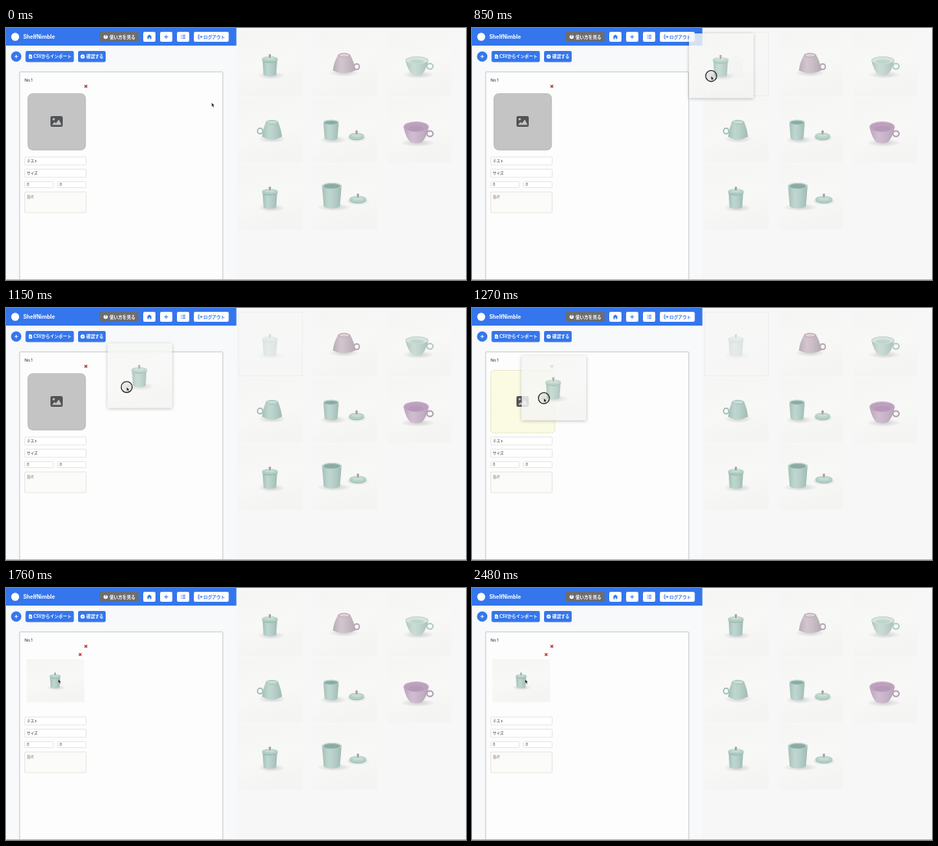
An HTML page for the animation above (2510 ms loop, 600 by 329 pixels).

```html
<!DOCTYPE html>
<html>
<head>
<meta charset="utf-8">
<title>Catalogue editor</title>
<style>
html, body { margin: 0; width: 100%; height: 100%; overflow: hidden; background: #f7f7f7; }
svg { display: block; width: 100%; height: 100%; }
text { font-family: Inter, "Noto Sans CJK JP", "Noto Sans CJK", sans-serif; fill: #222; }
.b { font-weight: 700; font-size: 5.6px; }
.jp { font-family: "Noto Sans CJK JP", "Noto Sans CJK", sans-serif; }
.s { font-size: 4.7px; }
.w { fill: #fff; }
.blue { fill: #3576ec; }
.field { fill: #fff; stroke: #dcdcdc; stroke-width: .7; }
.line { fill: none; stroke: #3576ec; stroke-width: 1; }
</style>
</head>
<body>
<svg id="stage" viewBox="0 0 600 329"></svg>
<script>
const LOOP = 2510, PRESS = 610, DRAG = 710, DROP = 1710;
const GRAB = { x: 32, y: 55 }, LAG = 12;
const mint = ['#b5d1c9', '#9fbfb6', '#c6dcd5'];
const pale = ['#c2d8d0', '#adc8be', '#d6e4de'];
const mauve = ['#cdbcc7', '#b5a1ae', '#ddd0d8'];
const plum = ['#cbb2ca', '#b193b2', '#bd9fbe'];

const rect = (x, y, w, h, r, more) =>
  `<rect x="${x}" y="${y}" width="${w}" height="${h}" rx="${r}" ${more}/>`;
const oval = (x, y, rx, ry, more) =>
  `<ellipse cx="${x}" cy="${y}" rx="${rx}" ry="${ry}" ${more}/>`;
const path = (d, more) => `<path d="${d}" ${more}/>`;
const text = (x, y, str, more) => `<text x="${x}" y="${y}" ${more}>${str}</text>`;
const group = (x, y, body, more = '') => `<g transform="translate(${x} ${y})" ${more}>${body}</g>`;
const fill = c => `fill="${c}"`;
const shadow = (x, y, rx, ry) => oval(x, y, rx, ry, 'fill="url(#shade)"');

// Tapered vessel between two ellipses, with side shading
function vessel(x, top, rTop, bottom, rBot, ry, [base, dark]) {
  const ryb = ry * rBot / rTop;
  const d = `M${x - rTop} ${top} L${x - rBot} ${bottom} A${rBot} ${ryb} 0 0 0 ${x + rBot} ${bottom} L${x + rTop} ${top}Z`;
  return path(d, fill(base)) + path(d, 'fill="url(#side)"') +
    oval(x, top, rTop, ry, fill(dark));
}

function lid(x, y, rx, ry, [base, dark, light]) {
  return oval(x, y + 1.2, rx, ry, fill(dark)) + oval(x, y, rx, ry, fill(base)) +
    oval(x, y - .9, rx * .62, ry * .55, fill(light)) +
    path(`M${x - .8} ${y - ry + 2}v-3h1.6v3z`, fill('#968c84')) +
    `<circle cx="${x}" cy="${y - ry - 1.6}" r="1.6" fill="#aaa098"/>`;
}

function jar() {
  return shadow(43, 56, 18, 5) +
    vessel(41.2, 37, 9.4, 54.5, 8.3, 2.8, mint) + lid(41.2, 34.4, 10.4, 3.3, mint);
}

function openJar(x, top, r, bottom, lx, ly, lr) {
  return shadow(x + 3, bottom + 2, r * 1.8, 5) + shadow(lx, ly + 3, lr * 1.4, 5) +
    vessel(x, top, r, bottom, r * .84, r * .32, mint) +
    oval(x, top, r, r * .32, fill(mint[2])) +
    oval(x, top + .5, r * .87, r * .25, fill('#8aaba3')) +
    lid(lx, ly, lr, 4.2, mint);
}

function handle(x, y, rx, ry, c) {
  return oval(x, y, rx, ry, `fill="none" stroke="${c}" stroke-width="1.7"`);
}

function bowl(x, top, r, ry, bottom, hx, hy, tone) {
  const d = `M${x - r} ${top} Q${x - r * .8} ${bottom - 5} ${x - r * .45} ${bottom} Q${x} ${bottom + 2.5} ${x + r * .45} ${bottom} Q${x + r * .8} ${bottom - 5} ${x + r} ${top}Z`;
  return shadow(x + 2, bottom + 1, r * 1.4, 5) + handle(hx, hy, 4, 3.6, tone[1]) +
    path(d, fill(tone[0])) + path(d, 'fill="url(#side)"') +
    oval(x, top, r, ry, fill(tone[0])) +
    oval(x, top + .4, r - 1, ry - .8, fill(tone[2])) +
    oval(x, top + ry * .35, r * .62, ry * .5, `fill="${tone[1]}" opacity=".55"`);
}

function upturned(x, top, rTop, bottom, rBot, hx, hy, tone) {
  const d = `M${x - rTop} ${top} Q${x - rBot + 1} ${top + 9} ${x - rBot} ${bottom} Q${x} ${bottom + 7} ${x + rBot} ${bottom} Q${x + rBot - 1} ${top + 9} ${x + rTop} ${top}Z`;
  return shadow(x, bottom + 3, rBot * 1.4, 5) + handle(hx, hy, 3.4, 3.6, tone[1]) +
    path(d, fill(tone[0])) + path(d, 'fill="url(#side)"') +
    oval(x, top, rTop, 2.9, fill(tone[1])) +
    oval(x, top, rTop - 1.2, 2, fill(tone[2]));
}

const photo = (w, h) => rect(0, 0, w, h, 0, 'fill="url(#paper)"');
const tile = (x, y, body, more) => group(x, y, photo(84, 84) + body, more);

function blueButton(x, w, label, lx) {
  return rect(x, 30, w, 14.5, 2, 'class="blue"') + text(lx, 39.2, label, 'class="b jp w"');
}

function cross(x, y, more = '') {
  return path(`M${x - 1.7} ${y - 1.7}l3.4 3.4m0 -3.4l-3.4 3.4`,
    `stroke="#bd2c20" stroke-width="1.25" fill="none" ${more}`);
}

const defs = `<defs>
  <linearGradient id="side"><stop offset="0" stop-color="#4f625e" stop-opacity=".2"/>
    <stop offset=".35" stop-color="#fff" stop-opacity=".12"/>
    <stop offset="1" stop-color="#4f625e" stop-opacity=".22"/></linearGradient>
  <radialGradient id="shade"><stop offset="0" stop-color="#8c938e" stop-opacity=".4"/>
    <stop offset="1" stop-color="#8c938e" stop-opacity="0"/></radialGradient>
  <linearGradient id="paper" x2=".3" y2="1"><stop offset="0" stop-color="#f5f6f4"/>
    <stop offset=".6" stop-color="#f8f8f7"/><stop offset="1" stop-color="#f4f4f3"/></linearGradient>
  <filter id="lift" x="-20%" y="-20%" width="140%" height="140%">
    <feDropShadow dx="0" dy="1" stdDeviation="2.2" flood-color="#000" flood-opacity=".33"/></filter>
</defs>`;

const header = rect(0, 0, 300.5, 23, 0, 'class="blue"') +
  '<circle cx="12" cy="11.5" r="5.2" fill="#fff"/>' +
  text(22.5, 14.1, 'ShelfNimble', 'class="w" font-weight="700" font-size="6.9"') +
  rect(122, 5, 51, 13, 2.5, 'fill="#6b6d71"') +
  '<circle cx="130" cy="11.6" r="2.7" fill="#fff"/>' +
  text(130, 13.2, '?', 'text-anchor="middle" font-size="4.4" font-weight="800" style="fill:#6b6d71"') +
  text(135, 13.7, '使い方を見る', 'class="b jp w"') +
  [[179, 16], [201, 16], [223, 16], [245, 45.5]].map(([x, w]) => rect(x, 5, w, 13, 2, 'class="w"')).join('') +
  path('M183.6 11.6L187 8.6l3.4 3h-.9v2.9h-1.7v-2h-1.6v2h-1.7v-2.9z', 'class="blue"') +
  path('M206.3 11.6h5.2m-2.6 -2.6v5.2', 'class="line"') +
  path('M228.3 9.5h1m1 0h3.6m-5.6 2.1h1m1 0h3.6m-5.6 2.1h1m1 0h3.6', 'class="line"') +
  path('M252.6 9.2h-1.6v4.8h1.6m0 -2.4h3m-1.5 -1.7l1.7 1.7l-1.7 1.7', 'class="line"') +
  text(257.6, 13.7, 'ログアウト', 'class="b jp blue" style="fill:#3576ec"');

const tools = '<circle cx="13.3" cy="37.2" r="6.7" class="blue"/>' +
  path('M11 37.2h4.6m-2.3 -2.3v4.6', 'stroke="#fff" stroke-width=".9"') +
  blueButton(25.5, 63, 'CSVからインポート', 35.8) +
  path('M29.8 34.4h2.8l1.5 1.5v4.1h-4.3z', 'class="w"') +
  path('M30.8 37.2h2.3m-2.3 1.3h2.3', 'stroke="#3576ec" stroke-width=".6"') +
  blueButton(94, 36, '確認する', 104.8) +
  '<circle cx="100" cy="37.2" r="2.7" class="w"/>' +
  path('M98.7 37.2l1 1l1.7 -1.9', 'class="line" style="stroke-width:.8"');

const form = rect(17.8, 57.2, 265, 280, 1, 'fill="#fdfdfd" stroke="#bcbcbc" stroke-width=".8"') +
  text(24.2, 69.7, 'No.1', 'font-size="5.3"') + cross(104.2, 76.2) +
  rect(24.5, 168.3, 80, 10.6, 1, 'class="field"') + text(27.2, 175.4, 'テスト', 'class="s jp"') +
  rect(24.5, 184.3, 80, 10.6, 1, 'class="field"') + text(27.2, 191.4, 'サイズ', 'class="s jp"') +
  rect(24.5, 200.6, 37.2, 7.8, 1, 'class="field"') + text(27.2, 206.2, '0', 'class="s"') +
  rect(67.5, 200.6, 37, 7.8, 1, 'class="field"') + text(70, 206.2, '0', 'class="s"') +
  rect(24.5, 214, 80, 27, 1, 'fill="#fbfbf9" stroke="#dedad2" stroke-width=".7"') +
  text(27.2, 221.6, '備考', 'class="s jp" style="fill:#8b8b8b"');

const picture = rect(58, 115, 16, 14, 2, 'fill="#515355"') +
  '<circle cx="62.2" cy="119" r="1.5" fill="#c4c4c4"/>' +
  path('M60 126.5l3.2 -3.7l1.8 1.8l4 -5l3.4 6.9z', fill('#c4c4c4'));

const slot = `<g id="empty">${rect(28.7, 85.7, 75, 73.5, 6, 'fill="#c4c4c4" stroke="#a9a9a9" stroke-width=".7"')}</g>
  <g id="hot">${rect(24.5, 81.5, 83.5, 81.5, 4, 'fill="#fbfae2" stroke="#d5d4a6" stroke-width=".7" stroke-dasharray="2 1"')}</g>
  <g id="icon">${picture}</g>
  <g id="placed">${group(27, 93, photo(75, 56))}
    ${group(35.2, 90.8, jar(), '').replace('(35.2 90.8)', '(35.2 90.8) scale(.7)')}
    ${cross(96.7, 86.8)}</g>`;

const shelf = `<g id="taken">${rect(303.3, 5.3, 83.4, 83.4, 0, 'fill="none" stroke="#e6e6e6" stroke-width=".7"')}</g>` +
  tile(303, 5, group(0, 1, jar()), 'id="origin"') +
  tile(400, 5, upturned(41, 30.5, 8, 50.5, 14.5, 57.5, 45.5, mauve)) +
  tile(497, 5, bowl(39, 37, 15, 5, 55, 56, 45, pale)) +
  tile(303, 92, upturned(44, 31, 8.2, 50, 13, 28.5, 42.5, mint)) +
  tile(400, 92, openJar(24, 31, 10, 52, 57.3, 49, 10)) +
  tile(497, 92, bowl(38, 37, 16.5, 7, 57, 56, 46, plum)) +
  tile(303, 179, jar()) +
  tile(400, 179, openJar(25, 27, 12.7, 53, 59, 44.5, 11.3));

const arrow = path('M0 0v5.2l1.2 -1l.9 2l.9 -.4l-.9 -2h1.6z',
  'fill="#111" stroke="#fff" stroke-width=".35"');
const hand = path('M-.5 -1.6q.6 -.5 1 0v2l2.2 .5q.7 .3 .5 1.2l-.5 2h-2.9l-1.7 -2.4q0 -.7 .8 -.4l.6 .5z',
  'fill="#fff" stroke="#222" stroke-width=".6"');

const el = id => document.getElementById(id);
el('stage').innerHTML = defs + rect(0, 0, 600, 329, 0, 'fill="#f7f7f7"') +
  rect(0, 0, 300.5, 329, 0, 'fill="#f8f9fa"') + form + slot + header + tools + shelf +
  rect(0, 328, 600, 1, 0, 'fill="#b5b5b5"') +
  `<g id="drag" opacity=".83"><g filter="url(#lift)">${photo(84, 84)}</g>${jar()}</g>
  <g id="pointer"><circle id="ring" r="7.2" fill="#777" fill-opacity=".13" stroke="#161616" stroke-width="1.1"/>
  <g id="arrow">${arrow}</g><g id="hand">${hand}</g></g>`;

// Pointer stops: time, x, y
const stops = [
  [0, 268.3, 97.5], [60, 269, 97], [250, 309, 75], [430, 335, 61.5], [690, 335, 60.3],
  [800, 323, 61], [920, 290, 67], [1030, 235.3, 80], [1150, 158, 103], [1270, 94, 117.7],
  [1390, 79, 118.4], [1520, 73.2, 118.4], [1700, 68.5, 119.2], [1850, 68, 118.8],
  [2000, 68, 118.8], [2480, 69.3, 119.2], [2510, 69.3, 119.2]
];

function slope(i, k) {
  if (i === 0 || i === stops.length - 1) return 0;
  const [a, b, c] = [stops[i - 1], stops[i], stops[i + 1]];
  const p = (b[k] - a[k]) / (b[0] - a[0]), q = (c[k] - b[k]) / (c[0] - b[0]);
  return p * q > 0 ? 2 * p * q / (p + q) : 0;
}

function pointerAt(t) {
  let i = 0;
  while (i < stops.length - 2 && t >= stops[i + 1][0]) i++;
  const a = stops[i], b = stops[i + 1], d = b[0] - a[0], u = (t - a[0]) / d;
  const at = k => {
    const v = 1 - u;
    return a[k] * v * v * (1 + 2 * u) + b[k] * u * u * (3 - 2 * u) +
      d * u * v * (slope(i, k) * v - slope(i + 1, k) * u);
  };
  return { x: at(1), y: at(2) };
}

const show = (id, on) => el(id).setAttribute('display', on ? 'inline' : 'none');
const move = (id, x, y) => el(id).setAttribute('transform', `translate(${x.toFixed(2)} ${y.toFixed(2)})`);

function draw(t) {
  const p = pointerAt(t), dragging = t >= DRAG && t < DROP, done = t >= DROP;
  const over = dragging && p.x < 108;
  const onTile = p.x > 303 && t < DRAG;
  move('pointer', p.x, p.y);
  show('ring', t >= PRESS && t < DROP);
  show('hand', onTile);
  show('arrow', !onTile);
  show('drag', dragging);
  if (dragging) {
    const q = pointerAt(t - LAG);
    move('drag', q.x - GRAB.x, q.y - GRAB.y);
  }
  show('taken', dragging);
  el('origin').setAttribute('opacity', dragging ? .32 : 1);
  show('hot', over);
  show('empty', !over && !done);
  show('icon', !done);
  show('placed', done);
}

const start = performance.now();
function tick() {
  draw((performance.now() - start) % LOOP);
  requestAnimationFrame(tick);
}
tick();
</script>
</body>
</html>
```
